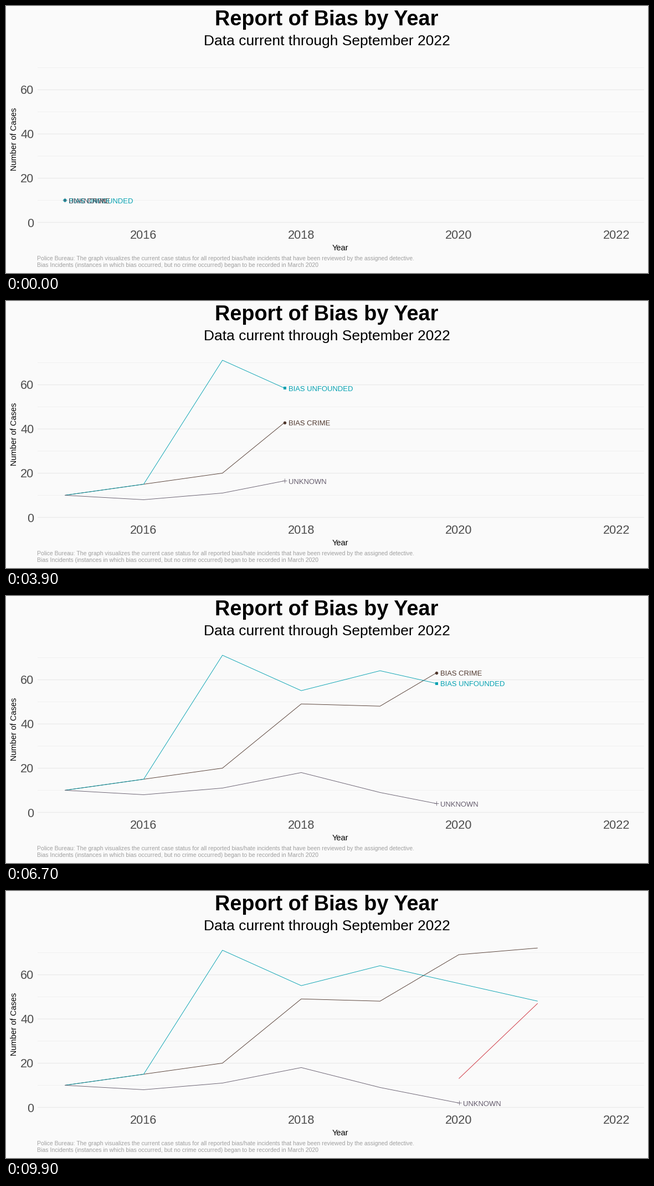
A matplotlib script for the animation above (10 s loop, 1159 px wide and 483 px high).

```python
import numpy as np
import matplotlib.pyplot as plt
from matplotlib.animation import FuncAnimation

W, H, DPI = 1159, 483, 72  # at 72 dpi one point is one pixel
FRAMES, INTERVAL = 100, 100
FIRST_YEAR, LAST_YEAR = 2015, 2022
YEARS = np.arange(FIRST_YEAR, LAST_YEAR + 1)
# Each year is reached on a whole frame; time runs evenly in between.
KEYS = np.round((YEARS - FIRST_YEAR) * (FRAMES - 1) / (LAST_YEAR - FIRST_YEAR))

LEFT, RIGHT, ZERO_Y, UNIT = 56.5, 1151.8, 391.5, 4.005
Y_MIN, Y_MAX = -1.55, 76.55

plt.rcParams["font.family"] = "Liberation Sans"
fig = plt.figure(figsize=(W / DPI, H / DPI), dpi=DPI, facecolor="#FAFAFA")
ax = fig.add_axes([LEFT / W, 1 - (ZERO_Y - Y_MIN * UNIT) / H,
                   (RIGHT - LEFT) / W, (Y_MAX - Y_MIN) * UNIT / H])
ax.set_xlim(FIRST_YEAR - 0.35, LAST_YEAR + 0.35)
ax.set_ylim(Y_MIN, Y_MAX)
ax.axis("off")


def label(x, y, text, size, color="black", **kw):
    """Place text by its pixel position, measured from the top left."""
    kw.setdefault("ha", "center")
    kw.setdefault("va", "baseline")
    return fig.text(x / W, 1 - y / H, text, fontsize=size, color=color, **kw)


label(579, 35, "Report of Bias by Year", 37.9, weight="bold")
label(579.5, 71, "Data current through September 2022", 26.4)
label(603.5, 441.5, "Year", 14.67)
label(22, 241, "Number of Cases", 14.67, rotation=90, ha="right", va="center")
label(56.5, 460.5, "Police Bureau: The graph visualizes the current case status for all "
      "reported bias/hate incidents that have been reviewed by the assigned detective.",
      10.48, "#A0A0A0", ha="left")
label(56.5, 472, "Bias Incidents (instances in which bias occurred, but no crime occurred) "
      "began to be recorded in March 2020", 10.48, "#A0A0A0", ha="left")

for value in range(0, 71, 10):
    major = value % 20 == 0
    ax.axhline(value, color="#EBEBEB" if major else "#F0F0F0",
               lw=1.4 if major else 1, zorder=1)
    if major:
        label(50.5, ZERO_Y - value * UNIT + 8, str(value), 21.7, "#4D4D4D", ha="right")
for year in range(2016, 2023, 2):
    x = LEFT + (year - FIRST_YEAR + 0.35) * (RIGHT - LEFT) / 7.7
    label(x, 421, str(year), 21.7, "#4D4D4D")


class Series:
    def __init__(self, name, color, marker, size, start, values):
        self.years = start + np.arange(len(values))
        self.values = np.array(values)
        self.first, self.last = np.interp(self.years[[0, -1]], YEARS, KEYS)
        self.line, = ax.plot([], [], color=color, lw=0.9,
                             solid_capstyle="butt", zorder=2)
        self.dot, = ax.plot([], [], ls="", marker=marker, ms=size, color=color,
                            mew=0.8 if marker == "+" else 0, zorder=3)
        self.text = ax.annotate(name, (start, values[0]), (7, -5.3),
                                textcoords="offset points", color=color,
                                fontsize=13, annotation_clip=False,
                                clip_on=True, zorder=4)

    def update(self, frame):
        now = min(np.interp(frame, KEYS, YEARS), self.years[-1])
        head = np.interp(now, self.years, self.values)
        # The closing point of a finished line only joins at the very end.
        if frame < self.last:
            past = self.years < now
            xs = np.append(self.years[past], now)
            ys = np.append(self.values[past], head)
        else:
            n = len(self.years) - (not self.last < frame == FRAMES - 1)
            xs, ys = self.years[:n], self.values[:n]
        self.line.set_data(xs, ys)
        self.dot.set_data([now], [head])
        self.text.xy = (now, head)

        self.line.set_visible(frame > self.first)
        shown = frame >= self.first and frame != self.last
        self.dot.set_visible(shown)
        self.text.set_visible(shown)
        return self.line, self.dot, self.text


series = [
    Series("BIAS CRIME", "#4F372D", "o", 5.5, 2015, [10, 15, 20, 49, 48, 69, 72, 59]),
    Series("BIAS INCIDENT", "#CC2A36", "^", 6.5, 2020, [13, 47, 73]),
    Series("BIAS UNFOUNDED", "#00A0B0", "s", 5, 2015, [10, 15, 71, 55, 64, 56, 48, 13]),
    Series("UNKNOWN", "#635A6B", "+", 7.5, 2015, [10, 8, 11, 18, 9, 2]),
]


def update(frame):
    return [artist for s in series for artist in s.update(frame)]


anim = FuncAnimation(fig, update, frames=FRAMES, init_func=lambda: update(0),
                     interval=INTERVAL, repeat=True, repeat_delay=0)
plt.show()
```
